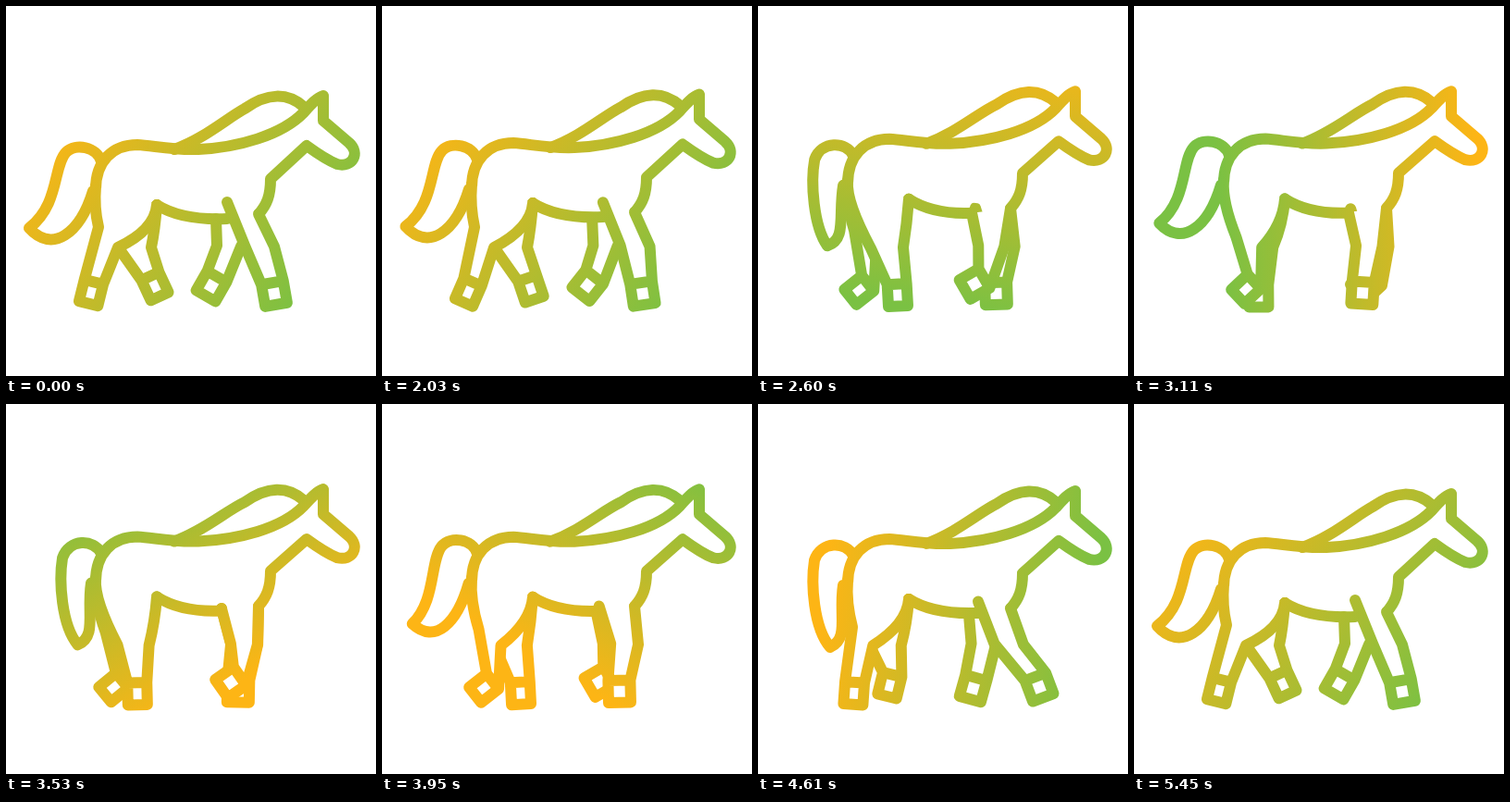
These frames come from a looping animation (400 by 400 pixels, 5.63 s). An HTML page:

```html
<!DOCTYPE html>
<html lang="en">
<head>
<meta charset="utf-8">
<title>Walking horse</title>
<style>
  html, body { margin: 0; width: 100%; height: 100%; overflow: hidden; background: #fff; }
  svg { display: block; width: 100vw; height: 100vh; }
  path { stroke: url(#ink); stroke-width: 12; stroke-linecap: round; stroke-linejoin: round; fill: none; }
  .solid { fill: #fff; }
</style>
</head>
<body>
<svg viewBox="0 0 400 400">
  <defs>
    <linearGradient id="ink" gradientUnits="userSpaceOnUse">
      <stop offset="0" stop-color="#fdb515"/>
      <stop offset="1" stop-color="#7ac143"/>
    </linearGradient>
  </defs>
  <path id="farHind" class="solid"/>
  <path id="farFore" class="solid"/>
  <path id="tail"/>
  <path id="body" class="solid"/>
  <path id="belly"/>
  <path id="nearHind" class="solid"/>
  <path id="nearFore" class="solid"/>
  <path id="mane"/>
</svg>
<script>
const LOOP = 5630, START = 2030, MOVE = 3420, STEP = 30;
const WALK = 2700, STRIDES = 6, SWISH = 1040;
const { sin, cos, abs, min, max, floor, PI } = Math;
const $ = id => document.getElementById(id);
const draw = (id, d) => $(id).setAttribute("d", d);
const mix = (a, b, k) => a + (b - a) * k;
const smooth = k => (1 - cos(PI * k)) / 2;

// Corners of a tilted hoof: ankle back, sole back, sole front, ankle front
function hoof({ x, y, tilt }, w, h) {
  const c = cos(tilt * PI / 180), s = sin(tilt * PI / 180);
  return [[-w, -h], [-w, h], [w, h], [w, -h]].map(([u, v]) => [x + u * c - v * s, y + u * s + v * c]);
}

// Phase 0 to 1 is the hind swing and the fore stance, 1 to 2 the reverse
function hindStep(u) {
  const k = u % 1, slow = k ** 1.5;
  if (u < 1) return { x: mix(92, 161, slow), y: mix(310, 303, k), tilt: mix(14, -25, k) + 56 * sin(PI * k) };
  const land = (1 - k) ** 4, leave = k ** 6;
  return { x: mix(161, 92, smooth(slow)), y: 314 - 11 * land - 4 * leave, tilt: 14 * leave - 25 * land };
}

function foreStep(u) {
  const k = u % 1;
  if (u < 1) return { x: mix(290, 222, k ** 0.8), y: 311 - 8 * k ** 4, tilt: 30 * k ** 3 - 10 * (1 - k) ** 2 };
  const lift = sin(PI * k), reach = sin(PI * k ** 5);
  return {
    x: mix(222, 290, k * k) + 42 * reach,
    y: mix(303, 311, k) - 6 * lift,
    tilt: mix(30, -10, k) + 50 * lift - 52 * reach
  };
}

function hind(id, phase, dy) {
  const foot = hindStep(phase % 2);
  const s = smooth(min(1, max(0, (foot.x - 92) / 60)));
  const box = hoof(foot, 10.5, 12);
  draw(id, `M97 ${195 + dy}Q95 ${218 + dy} ${mix(100, 122, s)} ${mix(239, 262, s)}L${box.join(" ")}` +
    ` ${mix(121, 157, s)} 261Q161 ${242 + dy} 163 ${215 + dy}M${box[0]}L${box[3]}`);
}

function fore(id, phase, dy) {
  const c = cos(PI * phase);
  const box = hoof(foreStep(phase % 2), 12, 12);
  draw(id, `M${233 + 6 * c} ${221 - 9 * c}L${243 + 15 * c} 259 ${box.join(" ")}` +
    ` ${272 + 18 * c} 260 273 ${225 + dy}M${box[0]}L${box[3]}`);
}

// w: 0 is swung out, 1 hangs down
function drawTail(w, dy) {
  const m = (a, b) => mix(a, b, w);
  const y = (a, b) => m(a, b) + dy;
  draw("tail", `M103 ${168 + dy}C${m(98, 95)} ${152 + dy} ${m(75, 68)} ${y(148, 152)} ${m(65, 61)} ${y(158, 173)}` +
    `C${m(51, 57)} ${y(172, 198)} ${m(58, 60)} ${y(215, 246)} ${m(25, 78)} ${y(240, 267)}` +
    `C${m(50, 99)} ${y(268, 258)} ${m(80, 87)} ${y(246, 232)} ${m(94, 92)} ${200 + dy}`);
}

function drawBody(dy) {
  const b = v => v + dy, h = v => v + dy * 0.75;
  draw("body", `M97 ${b(198)}C97 ${b(168)} 115 ${b(150)} 142 ${b(150)}C160 ${b(151)} 178 ${b(156)} 208 ${b(155)}` +
    `C250 ${b(153)} 298 ${h(140)} 322 ${h(115)}C329 ${h(107)} 336 ${h(99)} 343 ${h(97)}` +
    `L343 ${h(124)} 371 ${h(148)}C383 ${h(159)} 375 ${h(175)} 358 ${h(171)}` +
    `C348 ${h(167)} 336 ${h(159)} 325 ${h(151)}L286 ${b(187)}C286 ${b(205)} 282 ${b(215)} 273 ${b(225)}`);
  draw("mane", `M182 ${b(155)}C215 ${b(143)} 238 ${b(122)} 258 ${h(111)}C282 ${h(94)} 304 ${h(93)} 322 ${h(109)}`);
}

// One full turn of the gradient, tighter in the middle
function shade(k) {
  const s = sin(PI * k);
  const angle = (36 + 360 * smooth(k ** 0.75)) * PI / 180;
  const x = 200 + 35 * s, y = 203 - 48 * s, r = 170 - 33 * s;
  const dx = r * cos(angle), dy = r * sin(angle);
  const ends = { x1: x - dx, y1: y - dy, x2: x + dx, y2: y + dy };
  for (const key in ends) $("ink").setAttribute(key, ends[key]);
}

function swing(t) {
  const out = 3 * SWISH;
  return t < out ? sin(PI * t / SWISH) ** 2 : -0.08 * sin(PI * (t - out) / (MOVE - out));
}

function render(ms) {
  const moving = ms >= START && ms < START + MOVE;
  const t = moving ? (floor((ms - START) / STEP) + 1) * STEP : 0;
  const k = min(1, t / WALK);
  const phase = STRIDES * k + 0.1 * sin(PI * k);
  const dy = -6.5 * abs(sin(PI * phase)) ** 0.8;
  shade(t / MOVE);
  hind("farHind", phase + 1, dy);
  fore("farFore", phase + 1, dy);
  hind("nearHind", phase, dy);
  fore("nearFore", phase, dy);
  draw("belly", `M163 ${215 + dy}Q190 ${232 + dy} ${233 + 6 * cos(PI * phase)} ${230 + dy}`);
  drawTail(swing(t), dy);
  drawBody(dy);
}

const begin = performance.now();
function tick() {
  render((performance.now() - begin) % LOOP);
  requestAnimationFrame(tick);
}
tick();
</script>
</body>
</html>
```
